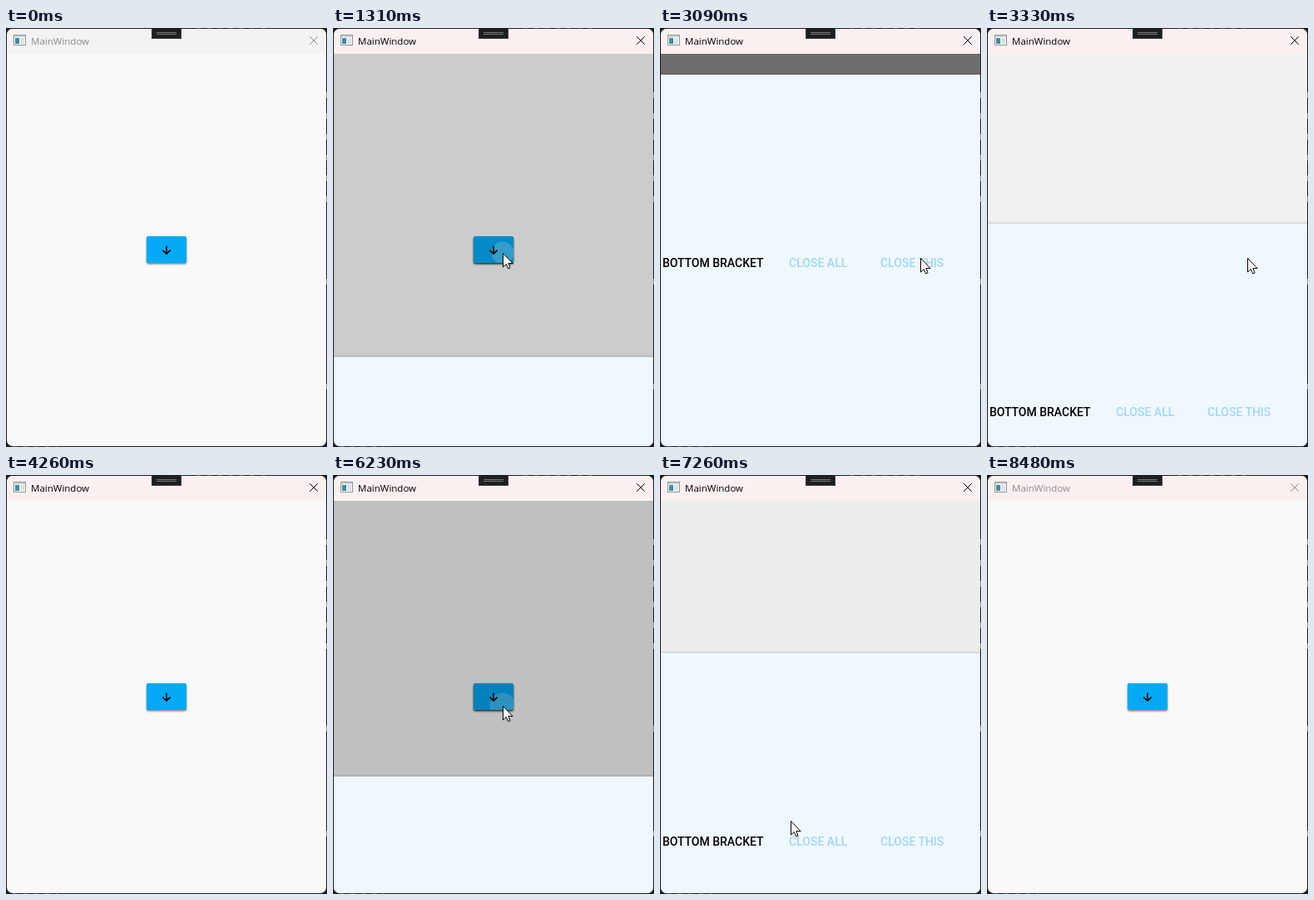
These frames come from a looping animation (386x503 px, 8.63 s). An HTML page:

```html
<!DOCTYPE html>
<html lang="en">
<head>
<meta charset="utf-8">
<title>MainWindow</title>
<style>
html, body { margin: 0; width: 100%; height: 100%; overflow: hidden; background: #1b1c1e; }
svg { display: block; width: 100%; height: 100%; }
.title { font: 11.5px "Open Sans", "Noto Sans", sans-serif; }
.label { font: 500 14px Roboto, sans-serif; }
</style>
</head>
<body>
<svg viewBox="0 0 386 503">
  <defs>
    <clipPath id="frame"><rect x="1" y="1" width="384" height="501" rx="7"/></clipPath>
    <clipPath id="face"><rect x="169" y="250" width="48" height="32" rx="2"/></clipPath>
    <linearGradient id="edge" x1="0" y1="0" x2="0" y2="1">
      <stop offset="0" stop-opacity="0"/>
      <stop offset="1" stop-opacity=".12"/>
    </linearGradient>
    <filter id="soft" x="-30%" y="-40%" width="160%" height="180%"><feGaussianBlur stdDeviation="1.3"/></filter>
  </defs>

  <rect width="386" height="503" fill="#1b1c1e"/>
  <path stroke="#4a4c4f" stroke-dasharray="5 8" d="M229 .5H312M8 502.5H62"/>
  <path stroke="#8d8f92" stroke-dasharray="7 18" d="M385.5 77V210M385.5 301V311M385.5 427V437"/>

  <g clip-path="url(#frame)">
    <rect width="386" height="503" fill="#f9f9f9"/>
    <rect id="bar" width="386" height="31"/>

    <rect id="shadow" x="169" y="251.5" width="48" height="32" rx="2" filter="url(#soft)"/>
    <rect x="169" y="250" width="48" height="32" rx="2" fill="#03a9f4"/>
    <g clip-path="url(#face)"><circle id="ripple" fill="#fff"/></g>
    <path d="M193 261.5v9.6M188.3 266.6l4.7 4.7 4.7-4.7" fill="none" stroke="#000" stroke-width="1.5"/>

    <rect id="cover" y="31" width="386" height="472"/>
    <g id="drawer">
      <rect y="-3" width="386" height="3" fill="url(#edge)"/>
      <rect width="386" height="447" fill="#f0f8ff"/>
      <rect id="hoverAll" x="139" y="209" width="102" height="32" rx="2" fill="#03a9f4" fill-opacity=".14"/>
      <rect id="hoverThis" x="249" y="209" width="108" height="32" rx="2" fill="#03a9f4" fill-opacity=".14"/>
      <g class="label">
        <text x="3" y="231">BOTTOM BRACKET</text>
        <g id="actions" fill="#1ba4f4">
          <text x="155" y="231">CLOSE ALL</text>
          <text x="265" y="231">CLOSE THIS</text>
        </g>
      </g>
    </g>
  </g>

  <g>
    <rect x="9.5" y="8.5" width="14" height="12" fill="#f4f6f7" stroke="#8e979c"/>
    <rect x="10" y="9" width="13" height="2" fill="#c9d0d4"/>
    <rect x="11" y="12" width="5" height="7" fill="#3f8f97"/>
    <rect x="17" y="12" width="5" height="7" fill="#dde2e6"/>
  </g>
  <text id="caption" class="title" x="30" y="20">MainWindow</text>
  <path id="cross" d="M365.2 10.2l9.6 9.6M374.8 10.2l-9.6 9.6" fill="none"/>

  <rect x="175.5" y="-1" width="35" height="13.5" fill="#1f1f20" stroke="#3a3a3c"/>
  <path stroke="#77777a" d="M181 5.5h24M181 7.5h24"/>

  <path id="cursor" d="M0 0V16.5L3.8 13 6.2 18.4 8.6 17.4 6.3 12.1H11.6Z" fill="#fff" stroke="#000" stroke-linejoin="round"/>
</svg>

<script>
const LOOP = 8630, TOP = 56, HEIGHT = 447, SCRIM = 0.56;

// Each visit: the pointer glides in, presses the button, closes the drawer and leaves
const visits = [
  {
    press: 1180, open: 1249, close: 3095, target: [204, 270], enter: [76, 492],
    glides: [
      { from: 90, until: 560, to: [204, 270] },
      { from: 1830, until: 2380, to: [313, 276], bend: 0.1 },
      { from: 3360, until: 3960, to: [284, 464], bend: 0.67 },
      { from: 3960, until: 4260, to: [74, 503] }
    ]
  },
  {
    press: 6080, open: 6149, close: 7040, target: [204, 277], enter: [112, 494],
    glides: [
      { from: 5570, until: 5980, to: [204, 277] },
      { from: 6300, until: 6560, to: [204, 348] },
      { from: 6700, until: 6890, to: [192, 283] },
      { from: 7080, until: 7400, to: [134, 503] }
    ]
  }
];

const $ = id => document.getElementById(id);
const set = (id, attrs) => {
  for (const key in attrs) $(id).setAttribute(key, attrs[key]);
};
const clamp = v => Math.max(0, Math.min(1, v));
const smooth = p => p * p * (3 - 2 * p);
const sineOut = p => Math.sin(clamp(p) * Math.PI / 2);
const sineIn = p => 1 - Math.cos(clamp(p) * Math.PI / 2);

// Point on a curve from a to b, bowed sideways by a share of its length
function bow(a, b, bend, u) {
  const dx = b[0] - a[0], dy = b[1] - a[1], side = 2 * u * (1 - u) * bend;
  return [a[0] + dx * u - dy * side, a[1] + dy * u + dx * side];
}

function pointer(t) {
  const visit = visits.find(({ glides }) => t >= glides[0].from && t < glides[glides.length - 1].until);
  if (!visit) return null;
  let at = visit.enter;
  for (const { from, until, to, bend = 0 } of visit.glides) {
    if (t < from) break;
    at = bow(at, to, bend, smooth(clamp((t - from) / (until - from))));
  }
  return at;
}

function draw(t) {
  const visit = visits.find(v => t >= v.press && t < v.close + 400);
  const closing = visit && t >= visit.close - 5;
  let shown = 0, dim = 0;
  if (visit) {
    const { open, close } = visit;
    shown = sineOut((t - open) / 400) - sineIn((t - close) / 400);
    dim = sineOut((t - open) / 300) - sineOut((t - close) / 300);
  }

  const active = t >= 1180 && t < 8480;
  const ink = active ? "#000" : "#8c8c8c";
  set("bar", { fill: t < 1180 ? "#f3f3f3" : "#faf0ef" });
  set("caption", { fill: ink });
  set("cross", { stroke: ink });

  const top = TOP + Math.round(HEIGHT * (1 - shown));
  set("cover", { opacity: SCRIM * dim });
  set("drawer", { transform: `translate(0 ${top})`, visibility: shown > 0.001 ? "visible" : "hidden" });
  set("actions", { opacity: closing ? 0.38 : 1 });

  const at = pointer(t);
  const over = (x, y, w, h) => at && at[0] >= x && at[0] < x + w && at[1] >= y && at[1] < y + h;
  const hover = (id, x, w) =>
    set(id, { opacity: !closing && shown > 0 && over(x, top + 209, w, 32) ? 1 : 0 });
  hover("hoverAll", 139, 102);
  hover("hoverThis", 249, 108);
  set("shadow", { opacity: over(169, 250, 48, 32) && shown < 0.5 ? 0.85 : 0.5 });

  if (visit) {
    const [cx, cy] = visit.target;
    set("ripple", {
      cx, cy,
      r: Math.min(50, (t - visit.press) * 0.103),
      opacity: 0.3 * (1 - clamp((t - visit.open) / 300))
    });
  } else set("ripple", { opacity: 0 });

  set("cursor", at
    ? { visibility: "visible", transform: `translate(${Math.round(at[0]) + 0.5} ${Math.round(at[1]) + 0.5})` }
    : { visibility: "hidden" });
}

const start = performance.now();
function tick() {
  draw((performance.now() - start) % LOOP);
  requestAnimationFrame(tick);
}
tick();
</script>
</body>
</html>
```
